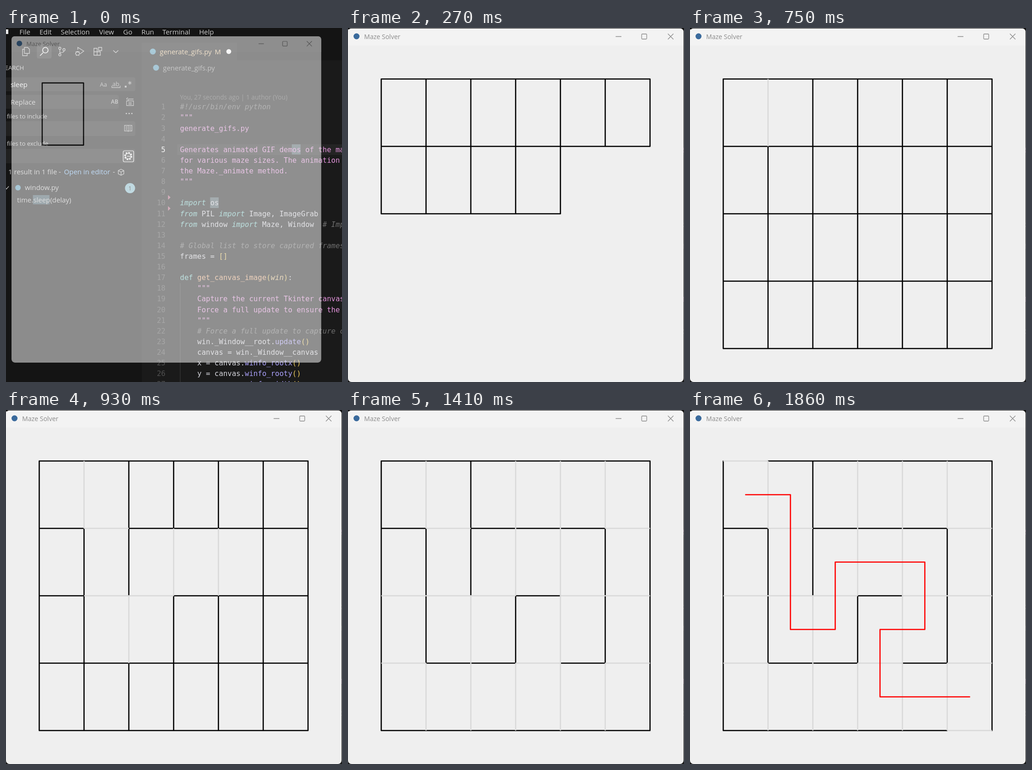
Recreate the animation shown at these times as an HTML page. Size 730x767 px, loop 1.89 s.

```html
<!DOCTYPE html>
<html lang="en">
<head>
<meta charset="utf-8">
<title>Maze Solver</title>
<style>
  html, body { margin: 0; width: 100%; height: 100%; overflow: hidden; background: #181818; }
  svg { display: block; width: 730px; height: 767px; }
  text { white-space: pre; font-family: "Open Sans", "Noto Sans", sans-serif; font-size: 14.9px; fill: #cccccc; }
  .code text { font-family: "DejaVu Sans Mono", monospace; font-size: 15.6px; }
  .line { fill: none; stroke: #bdbdbd; stroke-width: 1.3; }
  .k { fill: #82d2ce; }
  .i { fill: #82d2ce; font-style: italic; }
  .s { fill: #e394dc; }
  .w { fill: #d6d6dd; }
  .c { fill: #6d6d6d; font-style: italic; }
  .f { fill: #efb080; }
  .m { fill: #aaa0fa; }
  .y { fill: #ebc85d; }
  .p { fill: #ebc88d; font-style: italic; }
  .maze { fill: none; stroke-width: 2.6; }
</style>
</head>
<body>
<svg viewBox="0 0 730 767">
  <g id="editor">
    <rect width="730" height="767" fill="#141414"/>
    <rect x="295" y="70" width="435" height="697" fill="#1a1a1a"/>
    <rect x="295" y="32" width="207" height="38" fill="#1a1a1a"/>
    <rect x="-5" y="3" width="10" height="10" fill="#e8e8e8"/>
    <g id="menu"></g>

    <rect x="67" y="36" width="32" height="30" rx="4" fill="#2a2a2a"/>
    <g class="line">
      <path d="M40 42h7l4 4v9h-11zM40 46h-4v14h10v-5"/>
      <path stroke="#fff" stroke-width="1.6" d="M80.500 53.500L74 60"/>
      <circle stroke="#fff" stroke-width="1.600" cx="85.500" cy="48" r="6"/>
      <circle cx="117" cy="44" r="2.500"/><circle cx="126" cy="47" r="2.500"/><circle cx="117" cy="58" r="2.500"/>
      <path d="M117 46.500v9M126 49.500q0 4-9 4"/>
      <path d="M156 47v-5l13 8-8 6M151 52h9M151 56h-1M160 56h1M152 60l2-2M159 60l-2-2"/>
      <circle cx="155.500" cy="55" r="4"/>
      <path d="M191 44h7v15h-7zM191 51.500h14v7.500h-7M201 42h7v7h-7z"/>
      <path d="M233 48.500l5.500 5 5.500-5"/>
    </g>

    <text x="39" y="91" text-anchor="end" style="font-size:13px">SEARCH</text>
    <g fill="#202020">
      <rect x="-5" y="107" width="286" height="30" rx="4"/>
      <rect x="-5" y="145" width="250" height="30" rx="4"/>
      <rect x="-5" y="202" width="286" height="32" rx="4"/>
      <rect x="-5" y="262" width="286" height="31" rx="4"/>
    </g>
    <text x="10" y="128" style="fill:#fff">sleep</text>
    <text x="10" y="166">Replace</text>
    <text x="2" y="196" style="font-size:13px">files to include</text>
    <text x="2" y="255" style="font-size:13px">files to exclude</text>
    <g style="opacity:.85">
      <text x="204" y="127" style="font-size:13px">Aa</text>
      <text x="231" y="126" style="font-size:13px">ab</text>
      <text x="228" y="164" style="font-size:12px;font-weight:600">AB</text>
      <path class="line" d="M230 125v4h18v-4M269 115v8M265.500 117l7 4M265.500 121l7-4"/>
      <path fill="#bdbdbd" d="M258 125h4v4h-4zM260 184h3v2.500h-3zM266 184h3v2.500h-3zM272 184h3v2.500h-3z"/>
      <path class="line" d="M262 158h15v10h-15zM266 158v-4h11M266 162h7M266 165h7M264 156l-2-3 3-2"/>
      <path class="line" d="M257.500 211h16v12h-16zM265.500 211v14M260 214h3M260 217h3M260 220h3M268 214h3M268 217h3M268 220h3"/>
    </g>
    <rect x="254.500" y="266" width="23" height="24" rx="3" fill="#333" stroke="#fff" stroke-width="1.200"/>
    <circle cx="265.500" cy="277.500" r="7.500" fill="none" stroke="#fff" stroke-width="2.500" stroke-dasharray="3.500 2.390"/>
    <circle class="line" style="stroke:#fff" cx="265.500" cy="277.500" r="5.800"/>
    <path class="line" style="stroke:#fff" d="M263 278h7"/>

    <text x="5" y="317">1 result in 1 file - <tspan x="126" fill="#87c3ff">Open in editor</tspan><tspan x="232">-</tspan></text>
    <path class="line" d="M250 306l6 3v7l-6 3-6-3v-7zM244 309l6 3 6-3M250 312v7"/>
    <path class="line" d="M-1 346l2 3 5-6"/>
    <circle cx="26" cy="346" r="6" fill="#519aba"/>
    <text x="41" y="351">window.py</text>
    <circle cx="269.500" cy="347" r="11" fill="#88c0d0"/>
    <text x="269.500" y="351.500" text-anchor="middle" style="font-size:12px;fill:#141414">1</text>
    <rect x="58.500" y="362" width="36" height="20" fill="#3c5560"/>
    <text x="24" y="378">time.sleep(delay)</text>

    <circle cx="319" cy="51" r="6.500" fill="#519aba"/>
    <text x="334" y="57" style="fill:#f1d0a0">generate_gifs.py<tspan x="453.500">M</tspan></text>
    <circle cx="484" cy="51" r="5.300" fill="#fff"/>
    <circle cx="326" cy="86" r="6.500" fill="#519aba"/>
    <text x="341" y="92" style="fill:#9a9a9a">generate_gifs.py</text>
    <text x="378" y="155" style="font-size:13.700px;fill:#5c5c5c">You, 27 seconds ago | 1 author (You)</text>
    <rect x="372" y="252" width="358" height="23" fill="#242424"/>
    <path fill="#4a5a62" d="M621 252h19v22h-19zM443.500 367h18.500v23h-18.500z"/>
    <path fill="#b0607c" d="M352 362l5.500 5-5.500 5zM352 386l5.500 5-5.500 5z"/>
    <path stroke="#3a3a3a" d="M378.500 553v214"/>
    <g class="code" id="code"></g>
  </g>

  <g id="window">
    <rect x="-.5" y=".5" width="730" height="767" rx="9" fill="#222"/>
    <rect x="0" y="1" width="729" height="766" rx="8" fill="#efefef"/>
    <path d="M0 38V9q0-8 8-8h713q8 0 8 8v29z" fill="#f3f3f3"/>
    <circle cx="18.500" cy="18" r="6.500" fill="#3a6a9c"/>
    <text x="35" y="24" style="font-size:14px;fill:#8b8b8b">Maze Solver</text>
    <path fill="none" stroke="#8b8b8b" stroke-width="1.300" d="M581.500 18.500h12.500M639.500 13h8q1.500 0 1.500 1.500v8q0 1.500-1.500 1.500h-8q-1.500 0-1.500-1.500v-8q0-1.500 1.500-1.500zM695 12.500l12 12M707 12.500l-12 12"/>
    <path class="maze" id="walls" stroke="#000" stroke-linecap="round"/>
    <path class="maze" id="gaps" stroke="#d9d9d9"/>
    <path class="maze" id="route" stroke="#f00" stroke-linecap="round" stroke-linejoin="round"/>
  </g>
</svg>
<script>
const STEP = 30, LOOP = 1890, COLS = 6, ROWS = 4;
const BREAK_START = 24, ENTRANCE = 48, EXIT = 49, SOLVE_START = 50;
const $ = id => document.getElementById(id);

function addText(parent, x, y, attrs, content = '') {
  const el = document.createElementNS('http://www.w3.org/2000/svg', 'text');
  Object.entries({ x, y, ...attrs }).forEach(([k, v]) => el.setAttribute(k, v));
  el.textContent = content;
  parent.appendChild(el);
  return el;
}

// Each token is a style letter followed by its text; tokens are split by "~".
const source = [
  'c#!/usr/bin/env python', 's"""', 'sgenerate_gifs.py', '',
  'sGenerates animated GIF demos of the maze', 'sfor various maze sizes. The animation is',
  'sthe Maze._animate method.', 's"""', '',
  'iimport~w os', 'ifrom~w PIL ~iimport~w Image, ImageGrab',
  'ifrom~w window ~iimport~w Maze, Window  ~c# Import', '',
  'c# Global list to store captured frames', 'wframes = ~y[]', '',
  'kdef ~fget_canvas_image~y(~pwin~y)~w:', 's    """',
  's    Capture the current Tkinter canvas', 's    Force a full update to ensure the window',
  's    """', 'c    # Force a full update to capture c',
  'w    win._Window__root.~mupdate~y()', 'w    canvas = win._Window__canvas',
  'w    x = canvas.~mwinfo_rootx~y()', 'w    y = canvas.~mwinfo_rooty~y()',
  'w    w = canvas.~mwinfo_width~y()'
];

function buildEditor() {
  const menu = { File: 41, Edit: 86, Selection: 150.5, View: 218.5, Go: 264.5, Run: 308, Terminal: 370, Help: 435.5 };
  for (const [name, x] of Object.entries(menu)) addText($('menu'), x, 13.5, { 'text-anchor': 'middle' }, name);

  source.forEach((line, n) => {
    const y = 176.3 + n * 23.12;
    addText($('code'), 346.5, y, { 'text-anchor': 'end', style: `fill:${n === 4 ? '#fff' : '#505050'}` }, n + 1);
    const row = addText($('code'), 378, y, {});
    for (const token of line.split('~')) {
      const span = document.createElementNS('http://www.w3.org/2000/svg', 'tspan');
      span.setAttribute('class', token[0] || 'w');
      span.textContent = token.slice(1);
      row.appendChild(span);
    }
  });
}

const px = col => +(72.2 + col * 97.33).toFixed(2);
const py = row => +(110.5 + row * 146).toFixed(2);
const across = (col, row) => `M${px(col)} ${py(row)}H${px(col + 1)}`;
const down = (col, row) => `M${px(col)} ${py(row)}V${py(row + 1)}`;

const parse = text => text.split(' ').map(cell => [...cell].map(Number));
const trail = parse('00 10 11 12 22 21 31 41 42 32 33 43 53 52 51 50 40 30 20');
const branch = parse('33 23 13 03 02 01');
const solution = trail.slice(0, 13);

const wallBetween = ([c1, r1], [c2, r2]) =>
  r1 === r2 ? down(Math.max(c1, c2), r1) : across(c1, Math.max(r1, r2));
const wallsAlong = cells => cells.slice(1).map((cell, i) => wallBetween(cells[i], cell));
const broken = [...wallsAlong(trail), ...wallsAlong(branch)];

function render(time) {
  const tick = Math.floor((time % LOOP) / STEP);

  const gaps = broken.slice(0, Math.max(0, tick - BREAK_START));
  if (tick >= ENTRANCE) gaps.push(across(0, 0));
  if (tick >= EXIT) gaps.push(across(COLS - 1, ROWS));

  const walls = new Set();
  for (let i = 0; i < Math.min(tick + 1, COLS * ROWS); i++) {
    const c = i % COLS, r = Math.floor(i / COLS);
    [down(c, r), down(c + 1, r), across(c, r), across(c, r + 1)].forEach(w => walls.add(w));
  }
  gaps.forEach(w => walls.delete(w));

  const moves = Math.max(0, tick - SOLVE_START);
  const points = moves ? solution.slice(0, moves + 1) : [];
  $('walls').setAttribute('d', [...walls].join(''));
  $('gaps').setAttribute('d', gaps.join(''));
  $('route').setAttribute('d', points.map(([c, r], i) => `${i ? 'L' : 'M'}${px(c + .5)} ${py(r + .5)}`).join(''));

  // The window is still opening on the first tick.
  $('window').setAttribute('transform', tick ? '' : 'translate(12 17) scale(.923)');
  $('window').setAttribute('opacity', tick ? 1 : .55);
}

buildEditor();
const start = performance.now();
function loop() {
  render(performance.now() - start);
  requestAnimationFrame(loop);
}
render(0);
requestAnimationFrame(loop);
</script>
</body>
</html>
```
